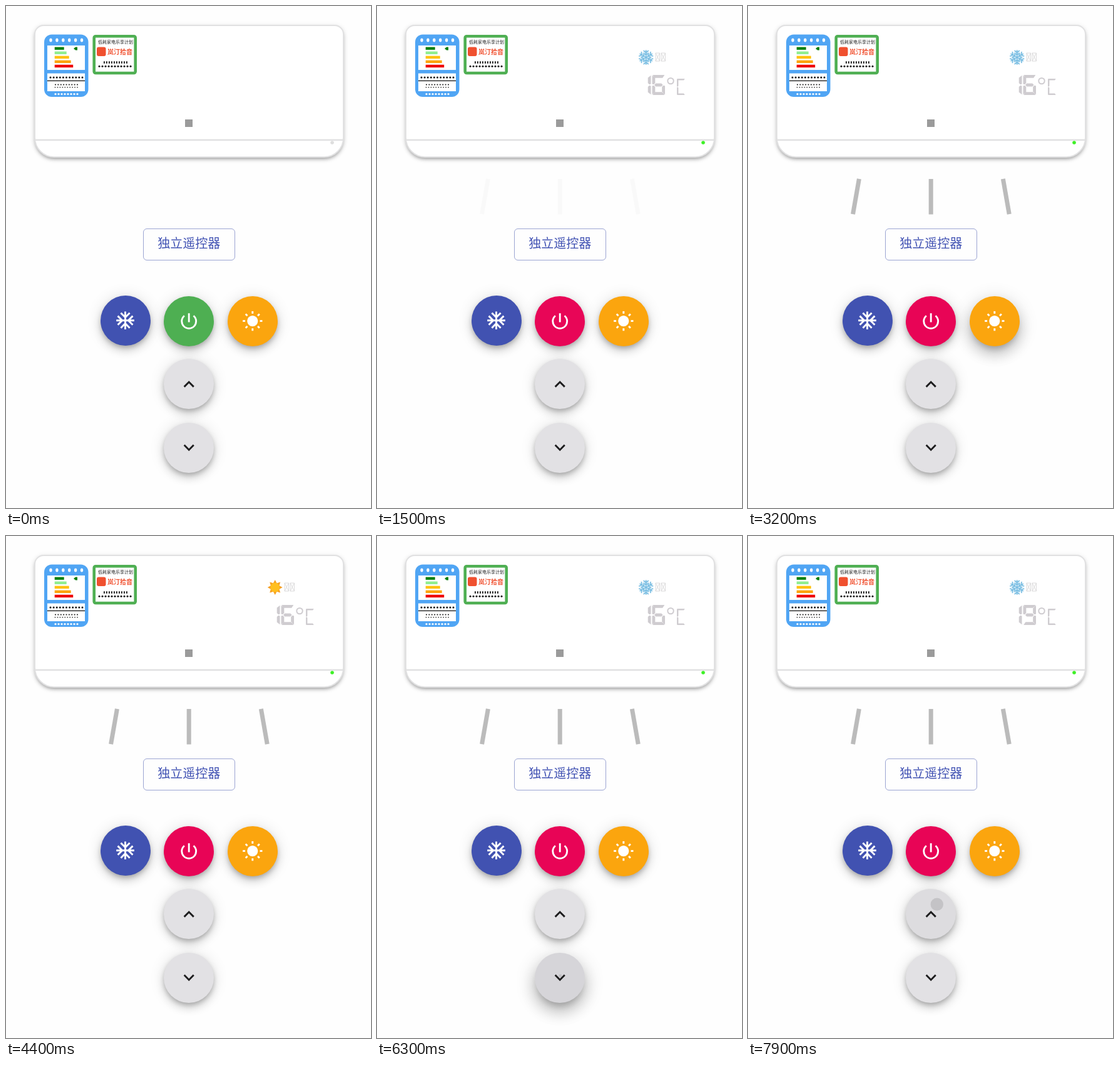
Animation of 583x801 px, one loop 8000 ms. Source, as an HTML page:

```html
<!DOCTYPE html>
<html lang="zh">
<head>
<meta charset="utf-8">
<title>独立遥控器</title>
<style>
  html, body { margin: 0; width: 100%; height: 100%; overflow: hidden; background: #fff; }
  #stage { position: absolute; left: 0; top: 0; width: 583px; height: 801px; overflow: hidden; background: #fefefe; }
  #stage > * { position: absolute; box-sizing: border-box; }
  #art { left: 0; top: 0; }
  #unit {
    left: 45px; top: 30px; width: 495px; height: 212px;
    background: #fff; border: 2px solid #e1e1e2; border-radius: 15px 15px 32px 32px;
    box-shadow: 0 4px 4px -2px rgba(0,0,0,.2), 0 4px 6px rgba(0,0,0,.13), 0 1px 8px rgba(0,0,0,.08);
  }
  #remote {
    left: 219px; top: 355px; width: 147px; height: 51px;
    border: 1.4px solid #9ca5d3; border-radius: 6px;
  }
  .fab { width: 80px; height: 80px; border-radius: 50%; overflow: hidden; }
  .fab i { position: absolute; border-radius: 50%; opacity: 0; }
  text { font-family: "Noto Sans CJK SC", "Noto Sans CJK", sans-serif; text-anchor: middle; }
</style>
</head>
<body>
<div id="stage">
  <div id="unit"></div>
  <div id="remote"></div>
  <svg id="art" width="583" height="801" viewBox="0 0 583 801">
    <path d="M46 213.8H539" stroke="#e1e1e2" stroke-width="2.6"/>
    <circle id="led" cx="521" cy="218" r="2.8"/>
    <rect x="286" y="181" width="12" height="12" fill="#9b9b9b"/>

    <g id="energy">
      <rect x="61" y="45.5" width="70.5" height="99.5" rx="12" fill="#50a5f4"/>
      <path d="M66 63h60v39H66zM66 107.5h60V136H66z" fill="#fff"/>
      <path d="M66 119.4h60" stroke="#111" stroke-width="1.4"/>
      <path d="M108 68l3-2.5h3v5h-3z" fill="#0b800f"/>
    </g>

    <g id="award">
      <rect x="140.7" y="48.2" width="66" height="58.8" rx="2.5" fill="#fff" stroke="#4faf53" stroke-width="4.6"/>
      <text x="175" y="60.2" font-size="7" font-weight="500" fill="#222">低耗家电乐享计划</text>
      <rect x="145" y="65.5" width="14.5" height="14.5" rx="3" fill="#f0502f"/>
      <text x="182" y="76.7" font-size="10" font-weight="700" fill="#f0502f">岚汀拾音</text>
      <path d="M156 90h38" stroke="#111" stroke-width="3.6" stroke-dasharray="1.8 2.2"/>
    </g>

    <g id="screen">
      <g id="cold" transform="translate(429.7 82)" fill="none" stroke="#7dbfe3" stroke-linecap="round"></g>
      <g id="hot" transform="translate(429.7 82)"></g>
      <g fill="none" stroke="#d9d7d9" stroke-width=".9">
        <path d="M445 75h6.5v13H445zl6.5 13M451.500 75l-6.500 13M454 75h6.500v13H454zl6.500 13M460.500 75l-6.500 13"/>
      </g>
      <g fill="#cfccd0">
        <path id="digits"/>
        <path id="unitC"/>
      </g>
      <circle cx="469" cy="119.600" r="4.700" fill="none" stroke="#cfccd0" stroke-width="2"/>
    </g>

    <g id="wind" fill="#bbb">
      <rect x="169" y="275.500" width="7" height="57" transform="rotate(10 172.500 304)"/>
      <rect x="288.700" y="276" width="7" height="56.500"/>
      <rect x="408.800" y="275.500" width="7" height="57" transform="rotate(-10 412.300 304)"/>
    </g>

    <text x="292.300" y="386.300" font-size="20" font-weight="500" fill="#4152b3">独立遥控器</text>
  </svg>
</div>
<script>
const LOOP = 8000, STEP = 100;
const $ = id => document.getElementById(id);
const stage = $('stage');

function svg(parent, tag, attrs) {
  const el = document.createElementNS('http://www.w3.org/2000/svg', tag);
  for (const k in attrs) el.setAttribute(k, attrs[k]);
  return parent.appendChild(el);
}

// Easing
const mix = (a, b, k) => a + (b - a) * k;
function bezier(x1, y1, x2, y2) {
  const at = (a, b, s) => 3 * a * s * (1 - s) ** 2 + 3 * b * s * s * (1 - s) + s ** 3;
  return x => {
    if (x <= 0) return 0;
    if (x >= 1) return 1;
    let lo = 0, hi = 1;
    for (let i = 0; i < 24; i++) {
      const s = (lo + hi) / 2;
      if (at(x1, x2, s) < x) lo = s; else hi = s;
    }
    return at(y1, y2, lo);
  };
}
const standard = bezier(.4, 0, .2, 1), soft = bezier(.25, .1, .25, 1);
const ramp = (t, start, ms, ease = standard) => ease((t - start) / ms);

// Stickers
function dots(parent, y, x0, x1, n, rx, ry, fill) {
  for (let i = 0; i < n; i++)
    svg(parent, 'ellipse', { cx: mix(x0, x1, i / (n - 1)), cy: y, rx, ry, fill });
}
const energy = $('energy');
dots(energy, 54.5, 71.5, 121, 6, 2.2, 2.9, '#fff');
dots(energy, 114, 71, 122, 11, 1.5, 1.5, '#111');
dots(energy, 125.5, 79, 114, 9, 1.1, 1.1, '#222');
dots(energy, 129.8, 78.5, 114, 10, 1, .8, '#222');
dots(energy, 140.5, 79, 114, 8, 1.6, 1.6, '#fff');
dots($('award'), 96.3, 149, 199, 11, 1.5, 1.5, '#111');
[['#0b800f', 15], ['#90ee90', 19], ['#ffc20c', 23], ['#fba50e', 26], ['#ee0505', 29.5]].forEach(
  ([fill, width], i) => svg(energy, 'rect', { x: 77.7, y: 65.5 + 7.05 * i, width, height: 4.4, fill }));

// Mode symbols
for (let i = 0; i < 6; i++) {
  const transform = `rotate(${i * 60})`;
  svg($('cold'), 'path', { d: 'M0 0V-11M-3.500 -10.500L0 -7.500L3.500 -10.500M-3 -6.500L0 -4L3 -6.500', 'stroke-width': 1.8, transform });
  svg($('cold'), 'path', { d: 'M0 -4V-8.500', 'stroke-width': 1.3, stroke: '#a6d7ef', transform: `rotate(${i * 60 + 30})` });
}
for (let i = 0; i < 8; i++)
  svg($('hot'), 'path', { d: 'M-3.300 -6L0 -12L3.300 -6z', fill: '#f6a023', transform: `rotate(${i * 45})` });
svg($('hot'), 'circle', { r: 7.4, fill: '#ffbf1f' });

// Seven-segment glyphs
const GLYPHS = { 1: 'bc', 6: 'acdefg', 7: 'abc', 8: 'abcdefg', 9: 'abcdfg', C: 'adef' };
function glyph(ch, x, y, w, h, th) {
  const m = h / 2, g = th * .14, k = th * .8;
  const poly = pts => 'M' + pts.map(([a, b]) => `${(x + a).toFixed(2)} ${(y + b).toFixed(2)}`).join('L') + 'z';
  const top = [[g, 0], [w - g, 0], [w - k, th], [k, th]];
  const left = [[0, g], [th, k + g], [th, m - th / 2 - g], [th / 2, m - g], [0, m - th / 3]];
  const flipX = p => p.map(([a, b]) => [w - a, b]);
  const flipY = p => p.map(([a, b]) => [a, h - b]);
  const parts = {
    a: top, d: flipY(top), f: left, b: flipX(left), e: flipY(left), c: flipX(flipY(left)),
    g: [[th * .7, m], [th * 1.2, m - th / 2], [w - th * 1.2, m - th / 2], [w - th * .7, m], [w - th * 1.2, m + th / 2], [th * 1.2, m + th / 2]]
  };
  return [...GLYPHS[ch]].map(s => poly(parts[s])).join('');
}
$('unitC').setAttribute('d', glyph('C', 479, 116, 13, 26, 2.4));

// Round buttons
const GREEN = [78, 175, 82], RED = [232, 4, 86], GREY = [226, 225, 228], DARK = [213, 212, 216];
const rgb = (a, b, k) => `rgb(${a.map((v, i) => Math.round(mix(v, b[i], k)))})`;
const spin = (n, d) => Array.from({ length: n }, (_, i) => [d, `rotate(${360 / n * i})`]);
const buttons = {
  snow: { x: 190.5, y: 501.7, bg: '#4152b1', paths: [...spin(4, 'M0 0V-10M-4.950 -8.360L0 -3.400L4.950 -8.360')] },
  power: { x: 292.2, y: 503, paths: [['M0 -9V1M5.130 -6.130A8 8 0 1 1 -5.130 -6.130', '']] },
  sun: { x: 393.8, y: 502.6, bg: '#fba50e', paths: spin(8, 'M0 -10.950V-8.200'), core: true },
  up: { x: 292.2, y: 603.2, ink: '#1d1d1e', paths: [['M-5.300 3.100L0 -2.200L5.300 3.100', '']] },
  down: { x: 292.2, y: 705, ink: '#1d1d1e', paths: [['M-5.300 -3.100L0 2.200L5.300 -3.100', '']] }
};
for (const name in buttons) {
  const b = buttons[name];
  b.el = document.createElement('div');
  b.el.className = 'fab';
  b.el.style.left = b.x - 40 + 'px';
  b.el.style.top = b.y - 40 + 'px';
  if (b.bg) b.el.style.background = b.bg;
  stage.insertBefore(b.el, $('art'));
  const ink = b.ink || '#fff';
  const icon = svg($('art'), 'g', {
    transform: `translate(${b.x} ${b.y}) scale(1.43)`, fill: 'none', stroke: ink, 'stroke-width': 2
  });
  b.paths.forEach(([d, transform]) => svg(icon, 'path', { d, transform }));
  if (b.core) svg(icon, 'circle', { r: 6, fill: ink, stroke: 'none' });
}

// Taps: button, x, y, press, ripple start, release
const taps = [
  ['power', 297, 488, 1060, 1034, 1090],
  ['sun', 394, 506, 3085, 3205, 3280],
  ['snow', 190, 505, 4600, 4700, 4780],
  ['down', 293, 702, 6114, 6234, 6320],
  ['up', 300, 590, 7030, 7030, 7110],
  ['up', 301, 589, 7260, 7260, 7340],
  ['up', 302, 588, 7480, 7480, 7560],
  ['up', 302, 588, 7865, 7790, 7950]
].map(([name, x, y, press, start, end]) => {
  const b = buttons[name], el = document.createElement('i');
  const dx = x - b.x, dy = y - b.y;
  const r = Math.hypot(41 + Math.abs(dx), 41 + Math.abs(dy));
  Object.assign(el.style, {
    left: 40 + dx - r + 'px', top: 40 + dy - r + 'px',
    width: 2 * r + 'px', height: 2 * r + 'px', background: b.ink ? '#000' : '#fff'
  });
  b.el.appendChild(el);
  return { name, el, press, start, end };
});

// Shadow layers: y, blur, spread, alpha
const REST = [[4, 7, -1, .2], [8, 14, 0, .14], [1, 24, 0, .12]];
const HELD = [[10, 11, -5, .2], [15, 22, 3, .14], [7, 30, 5, .12]];
const shadow = k => REST.map((layer, i) => {
  const [y, blur, spread, alpha] = layer.map((v, j) => mix(v, HELD[i][j], k));
  return `0 ${y}px ${blur}px ${spread}px rgba(0,0,0,${alpha})`;
}).join();

function render(t) {
  for (const name in buttons) {
    const b = buttons[name];
    let held = 0;
    for (const tap of taps)
      if (tap.name === name) held += ramp(t, tap.press, 250) - ramp(t, tap.end, 250);
    held = Math.max(0, Math.min(1, held));
    b.el.style.boxShadow = shadow(held);
    if (b.ink) b.el.style.backgroundColor = rgb(GREY, DARK, name === 'down' ? held : 0);
  }
  buttons.power.el.style.backgroundColor = rgb(GREEN, RED, ramp(t, 1100, 250));

  for (const { el, start, end } of taps) {
    const grow = ramp(t, start, 550);
    el.style.transform = `scale(${grow})`;
    el.style.opacity = t < start ? 0 : mix(.1, .2, grow) * (1 - ramp(t, end, 550));
  }

  const on = t >= 1050, heat = t >= 3280 && t < 4780;
  const temp = 16 + taps.filter(p => p.name === 'up' && t >= p.end).length;
  $('led').setAttribute('fill', on ? '#3df026' : '#dedede');
  $('screen').style.opacity = ramp(t, 1050, 250, soft);
  $('wind').style.opacity = ramp(t, 1350, 2000, soft);
  $('cold').style.display = heat ? 'none' : '';
  $('hot').style.display = heat ? '' : 'none';
  $('digits').setAttribute('d', glyph(1, 417, 110, 20.5, 32, 4.8) + glyph(temp % 10, 439.5, 110, 20.5, 32, 4.8));
}

const origin = performance.now();
function tick() {
  const t = Math.max(0, performance.now() - origin) % LOOP;
  render(Math.floor(t / STEP) * STEP);
  requestAnimationFrame(tick);
}
render(0);
requestAnimationFrame(tick);
</script>
</body>
</html>
```
